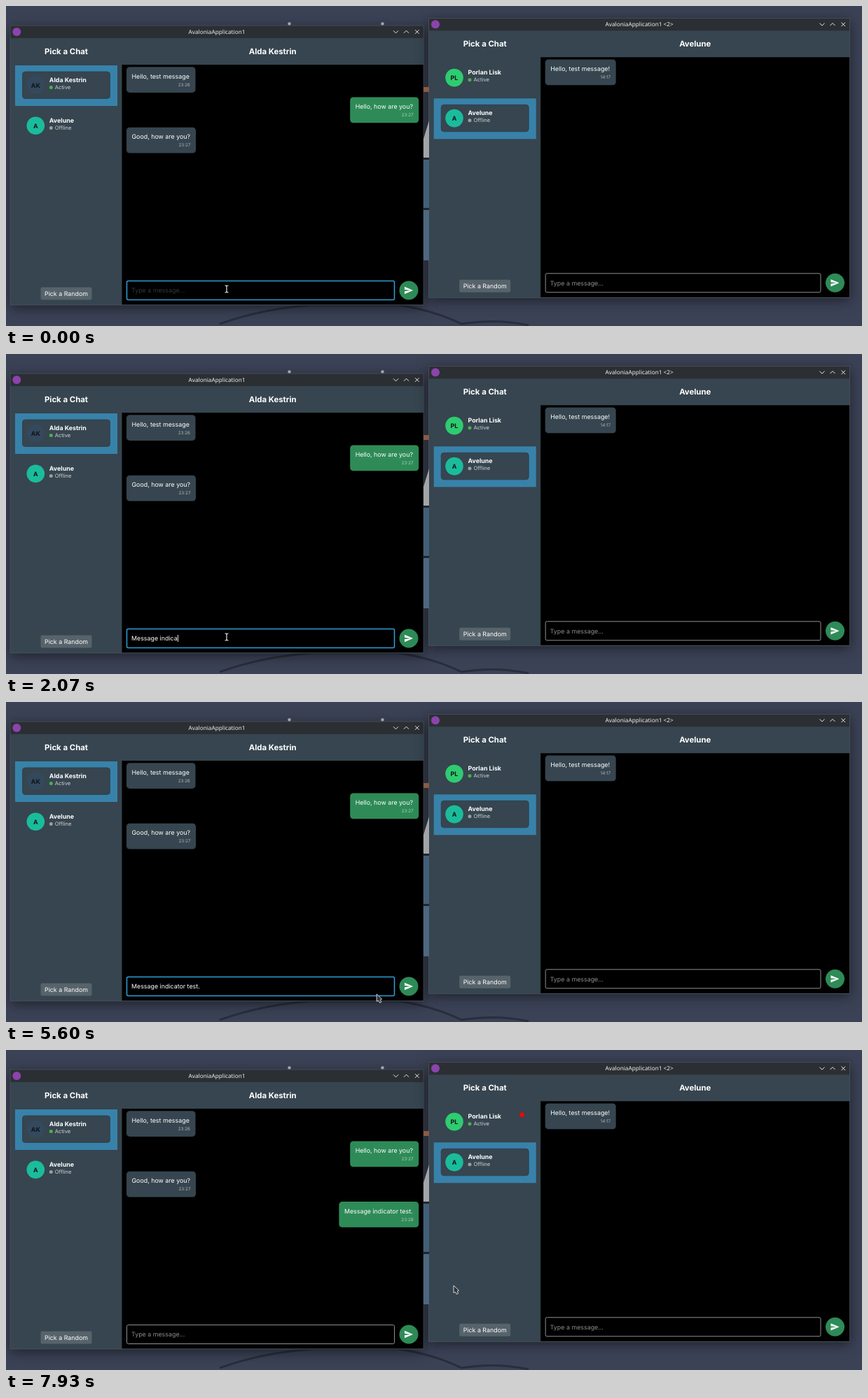
Recreate the animation shown at these times as an HTML page. Size 1222 by 458 pixels, loop 8000 ms.

```html
<!DOCTYPE html>
<html lang="en">
<head>
<meta charset="utf-8">
<title>Chat</title>
<style>
  html, body { margin: 0; width: 100%; height: 100%; overflow: hidden; background: #3b4256; }
  svg { display: block; width: 100%; height: 100%; }
  text { font: 8.87px Inter, sans-serif; fill: #fff; white-space: pre; text-rendering: geometricPrecision; }
  .title { font-size: 11.4px; font-weight: 700; text-anchor: middle; }
  .caption { font: 8.22px "Noto Sans", sans-serif; text-anchor: middle; fill: #eff0f1; }
  .bold { font-weight: 700; }
  .small { font-size: 7.6px; fill: #cdd3d6; }
  .time { font-size: 6.33px; text-anchor: end; fill-opacity: .6; }
  .middle { text-anchor: middle; }
  .hint { fill: #8c8c8c; }
  .shadow { filter: drop-shadow(0 4px 9px rgba(0, 0, 0, .5)); }
</style>
</head>
<body>
<svg id="stage" viewBox="0 0 1222 458" preserveAspectRatio="none"></svg>
<script>
const SLATE = '#36454f', GREEN = '#2e8b57';
const CONTACTS = {
  alda: { name: 'Alda Kestrin', initials: 'AK', color: '#34495e', status: 'Active' },
  avelune: { name: 'Avelune', initials: 'A', color: '#1abc9c', status: 'Offline' },
  porlan: { name: 'Porlan Lisk', initials: 'PL', color: '#2ecc71', status: 'Active' }
};

const rect = (x, y, w, h, fill, extra = '') =>
  `<rect x="${x}" y="${y}" width="${w}" height="${h}" fill="${fill}" ${extra}/>`;
const circle = (x, y, r, fill, extra = '') =>
  `<circle cx="${x}" cy="${y}" r="${r}" fill="${fill}" ${extra}/>`;
const label = (x, y, text, cls = '', extra = '') =>
  `<text x="${x}" y="${y}" class="${cls}" ${extra}>${text.replace(/</g, '&lt;')}</text>`;
const line = (d, color, width) =>
  `<path d="${d}" fill="none" stroke="${color}" stroke-width="${width}"/>`;

function contact({ name, initials, color, status }, y, selected) {
  const dot = status === 'Active' ? '#4caf50' : '#9e9e9e';
  const card = rect(13, y, 146, 58, '#3882aa') +
    rect(23.5, y + 9, 125, 38.5, SLATE, 'rx="4" stroke="#2c3e49" stroke-width=".8"');
  return (selected ? card : '') +
    circle(42.3, y + 28.3, 12.8, color) +
    label(42.3, y + 31.6, initials, 'bold middle', 'style="fill:#101418"') +
    label(61.8, y + 24.2, name, 'bold') +
    circle(64.3, y + 31.5, 2.5, dot) +
    label(69.8, y + 34, status, 'small');
}

function bubble(x, y, w, text, time, fill = SLATE, id = '') {
  return `<g ${id && `id="${id}" visibility="hidden"`}>` +
    rect(x, y, w, 36.7, fill, 'rx="4.5"') +
    label(x + 7.5, y + 16.6, text) + label(x + w - 7.5, y + 27.4, time, 'time') + '</g>';
}

// Laid out with the top-left corner at (6, 28); `right` is the right edge.
function chatWindow({ id, dx, dy, right, caption, contacts, selected, messages }) {
  const mid = (165.3 + right) / 2, width = right - 6;
  return `<g transform="translate(${dx} ${dy})">` +
    rect(6, 28, width, 400, SLATE, 'class="shadow"') +
    rect(6, 28, width, 18, '#2b2f33') +
    circle(15.3, 37, 6, '#8b44ac') +
    label((6 + right) / 2, 40, caption, 'caption') +
    line(`M${right - 43} 35.3l3.5 3.5 3.5-3.5M${right - 28} 38.7l3.5-3.5 3.5 3.5` +
      `M${right - 12} 34.2l5.6 5.6m0-5.6l-5.6 5.6`, '#fcfcfc', .9) +
    label(86, 69.2, 'Pick a Chat', 'title') +
    label(mid, 68.9, contacts[selected].name, 'title') +
    contacts.map((c, i) => contact(c, 85 + 58 * i, i === selected)).join('') +
    rect(49.5, 402.5, 73, 18, '#57636b', 'rx="2"') +
    label(86, 414.8, 'Pick a Random', 'middle') +
    rect(165.5, 84, right - 165.5, 343.5, '#000') +
    messages +
    rect(172.5, 393.5, right - 214, 27, '#000', `id="${id}Box" rx="2" stroke="#8f8f8f"`) +
    label(179, 410.3, 'Type a message...', 'hint', `id="${id}Text"`) +
    circle(right - 21, 407, 13.5, GREEN, `id="${id}Send"`) +
    `<path transform="translate(${right - 28.2} 400.1) scale(.575)" fill="#fff" d="M2 21L23 12 2 3v7l15 2-15 2z"/>` +
    rect(6, 28, width, 400, 'none', 'stroke="#555c64" stroke-width=".6"') + '</g>';
}

const desktop =
  rect(0, 0, 1222, 458, '#3b4256') +
  circle(404.5, 25.5, 2.2, '#b9bcc2') + circle(537.5, 25.5, 2.2, '#b9bcc2') +
  line('M305 455Q370 432 440 428H560Q612 436 650 455Q700 447 746 457', '#282e3c', 3);

const gap =
  rect(596, 116, 8, 7, '#8a5a45') +
  '<path d="M596 217V190L604 164V217z" fill="#a2a4a6"/>' +
  rect(596, 217, 8, 3, '#20242d') + rect(596, 220, 8, 69, '#435f78') +
  rect(596, 289, 8, 3, '#20242d') + rect(596, 292, 8, 72, '#4d687f');

const leftWindow = chatWindow({
  id: 'left', dx: 0, dy: 0, right: 596, caption: 'AvaloniaApplication1',
  contacts: [CONTACTS.alda, CONTACTS.avelune], selected: 0,
  messages:
    bubble(172, 87.2, 98.5, 'Hello, test message', '23:26') +
    bubble(491.2, 130.5, 98, 'Hello, how are you?', '23:27', GREEN) +
    bubble(172, 173.8, 99, 'Good, how are you?', '23:27') +
    bubble(475.4, 217.1, 113.8, 'Message indicator test.', '23:28', GREEN, 'sent')
});

const rightWindow = chatWindow({
  id: 'right', dx: 597.7, dy: -10.7, right: 606.8, caption: 'AvaloniaApplication1 <2>',
  contacts: [CONTACTS.porlan, CONTACTS.avelune], selected: 1,
  messages: bubble(172, 87.2, 101, 'Hello, test message!', '14:17') +
    circle(139, 103.5, 3.2, '#f00', 'id="unread" visibility="hidden"')
});

document.getElementById('stage').innerHTML = desktop + leftWindow + rightWindow + gap +
  rect(0, 402, .9, 10, '#fff', 'id="caret"') +
  `<g id="beam">${line('M-2.5-5Q0-5 0-3.5Q0-5 2.5-5M0-4V4M-2.5 5Q0 5 0 3.5Q0 5 2.5 5', '#e6e6e6', 1.2)}</g>` +
  '<path id="arrow" d="M0 0V10.5L2.6 9.4 4.4 12.6 6.6 11.4 5.2 8.2 7.5 7.2z" fill="#30343a" stroke="#e8e8e8" stroke-width=".9"/>';

const $ = id => document.getElementById(id);
const box = $('leftBox'), input = $('leftText'), send = $('leftSend');
const show = (el, on) => el.setAttribute('visibility', on ? 'visible' : 'hidden');

// [time, characters added]
const KEYS = [
  [400, 'M'], [530, 'e'], [730, 's'], [870, 's'], [1000, 'a'], [1200, 'g'], [1400, 'e'],
  [1470, ' '], [1600, 'i'], [1670, 'n'], [1730, 'd'], [1870, 'i'], [1930, 'c'], [2070, 'a'],
  [2130, 't'], [2270, 'o'], [2870, 'r'], [3000, ' '], [3400, 't'], [3530, 'es'], [3600, 't'],
  [4730, '.']
];
const BLUR = 6270, CLEAR = 6400, DELIVER = 6930, LOOP = 8000;

// [time, x, y] of the pointer
const PATH = [
  [0, 315, 405], [5150, 315, 405], [5600, 529, 418], [5950, 575, 410],
  [6070, 577, 408], [7540, 577, 408], [7930, 639, 337], [LOOP, 639, 337]
];

function pointerAt(t) {
  const i = PATH.findIndex(p => p[0] > t);
  const [t0, x0, y0] = PATH[i - 1], [t1, x1, y1] = PATH[i];
  const k = (t - t0) / (t1 - t0);
  return [x0 + (x1 - x0) * k, y0 + (y1 - y0) * k];
}

function draw(t) {
  const typed = KEYS.filter(([at]) => at <= t);
  const text = t < CLEAR ? typed.map(k => k[1]).join('') : '';
  const focused = t < BLUR;
  input.textContent = text || 'Type a message...';
  input.style.fill = text ? '#fff' : focused ? '#363636' : '#8c8c8c';
  box.setAttribute('stroke', focused ? '#2f9fd6' : '#8f8f8f');
  box.setAttribute('stroke-width', focused ? 1.5 : 1);

  const blinkOn = typed.length && (t - typed[typed.length - 1][0]) % 1000 < 470;
  show($('caret'), focused && blinkOn);
  if (text) $('caret').setAttribute('x', 179.3 + input.getComputedTextLength());

  const [x, y] = pointerAt(t);
  const overText = t < 5550;
  for (const id of ['beam', 'arrow']) $(id).setAttribute('transform', `translate(${x} ${y})`);
  show($('beam'), overText);
  show($('arrow'), !overText);
  send.setAttribute('fill', Math.hypot(x - 575, y - 407) < 13.5 ? '#1b1b1b' : GREEN);

  show($('sent'), t >= DELIVER);
  show($('unread'), t >= DELIVER);
}

const start = performance.now();
function tick() {
  draw((performance.now() - start) % LOOP);
  requestAnimationFrame(tick);
}
tick();
</script>
</body>
</html>
```
